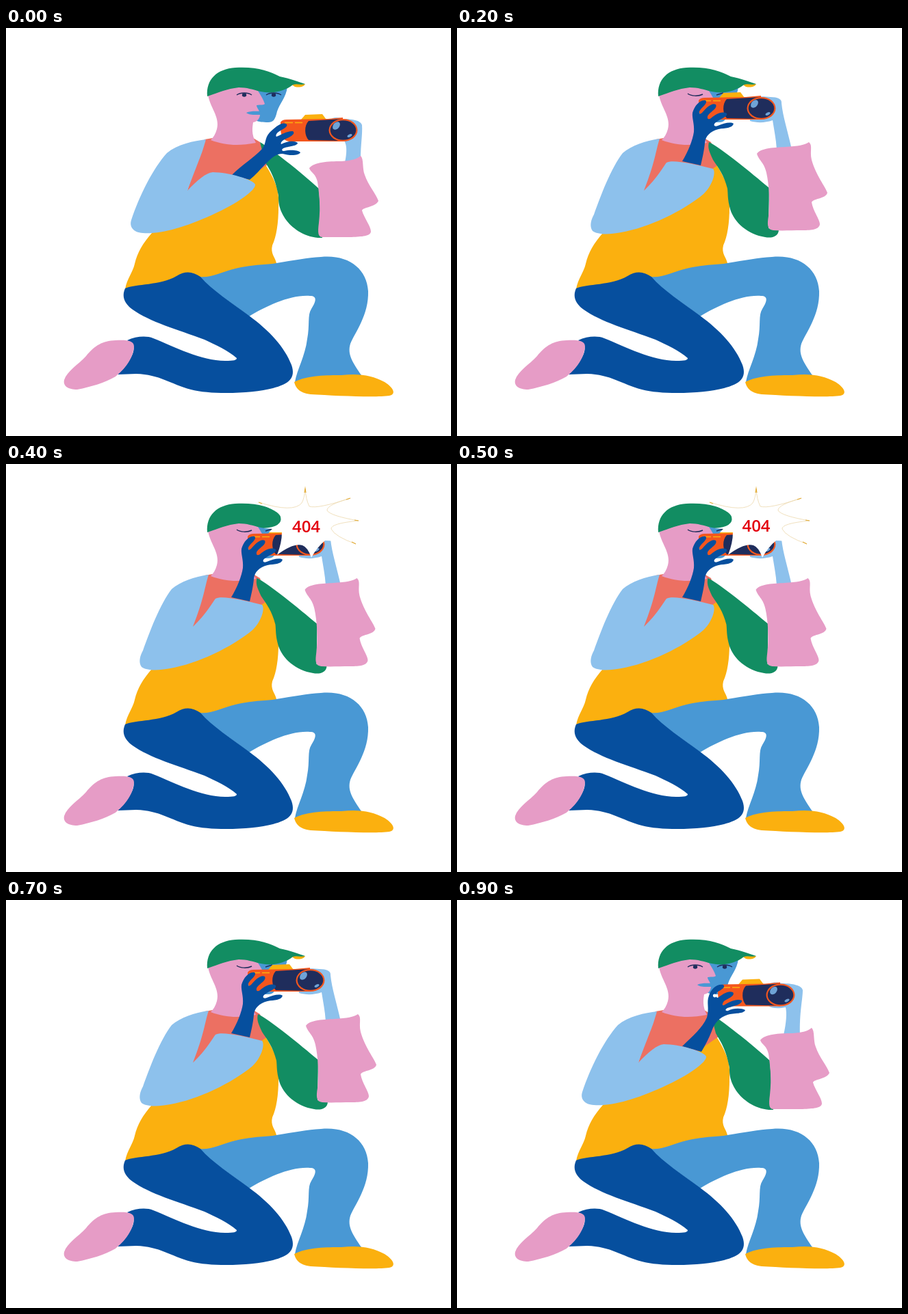
Write an HTML page with a canvas that moves like this. It is 650 px wide and 597 px high and loops after 1 s.

```html
<!DOCTYPE html>
<html lang="en">
<head>
<meta charset="utf-8">
<title>Photographer</title>
<style>
html, body { margin: 0; width: 100%; height: 100%; overflow: hidden; background: #fff; }
canvas { display: block; }
</style>
</head>
<body>
<canvas id="stage" width="650" height="597"></canvas>
<script>
const ctx = document.getElementById('stage').getContext('2d');

const C = {
  pink: '#e69cc6', green: '#128d62', yellow: '#fbb00f', sky: '#8dc1ec', blue: '#4998d4',
  royal: '#064f9e', coral: '#ec7062', orange: '#f4561d', navy: '#1f2d5c', red: '#e3000f'
};

const P = d => new Path2D(d);

const bodyParts = [
  [C.yellow, P('M213 300C200 315 192 328 188 345C185 358 177 366 174 382L250 385L320 372L380 358L395 344C393 335 386 330 389 318C395 305 398 285 398 262C400 235 392 222 379 200L350 218L300 210Z')],
  [C.blue, P('M282 364C300 366 315 357 335 352C365 345 380 347 395 344C420 340 440 336 460 335C500 331 527 352 529 385C530 420 510 445 503 462C498 478 507 490 519 508C490 510 460 508 422 518C425 500 437 480 440 455C444 435 440 420 446 411C453 400 455 392 444 392C415 390 380 407 355 422C335 405 300 385 282 364Z')],
  [C.royal, P('M174 381C190 374 225 377 249 363C262 355 272 356 284 364C301 384 330 402 355 421C385 443 407 467 417 493C424 513 412 521 390 527C360 535 300 537 270 529C240 521 225 507 190 506L163 507C175 497 190 475 186 465L177 457C190 451 205 450 215 454C245 466 285 487 320 487C333 487 337 486 337 483C325 472 305 463 290 456C250 441 210 430 185 412C170 401 170 390 174 381Z')],
  [C.pink, P('M85 515C89 502 105 493 117 480C130 464 141 458 160 457C176 456 187 457 187 466C185 486 172 500 160 510C144 519 125 525 104 529C91 529 83 524 85 515Z')],
  [C.yellow, P('M421 518C440 508 470 508 490 508C515 505 535 508 553 518C567 527 570 536 560 538C540 541 480 538 445 536C428 534 423 526 421 518Z')],
  [C.coral, P('M290 163L302 161L361 161L371 167L382 200L350 222L264 240Z')]
];

const head = [
  [C.blue, P('M362 90L411 86C409 102 400 110 396 122C393 135 390 138 383 138C375 138 369 137 366 136L362 128Z')],
  [C.pink, P('M295 97C297 115 313 130 308 148C306 155 303 160 299 164C320 172 340 173 365 168C358 155 360 145 361 138C367 137 370 133 371 128C371 120 366 117 366 113C372 112 377 113 378 111C376 105 372 98 368 92L345 84L300 92Z')],
  [C.blue, P('M351 124C358 121 366 122 373 122L373 127C365 127 356 128 351 124Z')],
  [C.yellow, P('M416 82L437 82C434 87 428 87 422 86Z')],
  [C.green, P('M294 100C292 75 308 60 335 58C365 56 385 63 400 71C415 74 428 79 437 82C430 84 425 81 419 83C408 92 390 97 372 93C360 90 352 87 340 87C322 89 312 94 294 100Z')]
];

const eyesOpen = P('M337 98C343 94 353 94 359 98M380 98C386 94 396 94 402 98');
const eyesShut = P('M337 96C342 100 353 100 359 97M379 98L389 95');

const lowArms = {
  arm: P('M292 163C286 185 285 185 265 238C280 222 292 212 302 211C325 211 362 222 364 229C365 237 340 256 300 274C260 292 225 302 200 300C185 299 180 290 183 281C195 245 215 205 235 183C250 170 275 165 292 163Z'),
  green: P('M371 167C385 175 430 210 457 235L462 307C440 308 420 295 410 282C398 265 398 255 398 245C392 215 385 208 378 195Z'),
  sleeve: P('M443 205C450 196 470 195 490 195C505 194 512 192 518 187C523 192 520 205 524 215C529 230 540 242 544 253C540 262 522 262 520 267C523 278 533 290 533 298C532 305 520 305 505 306L462 306C456 306 455 300 457 285C460 260 457 240 455 225C452 212 445 212 443 205Z')
};
const low = {
  ...lowArms, cam: [0, 0],
  grip: P('M472 137C475 130 485 130 492 133C505 133 518 135 520 142C521 155 518 170 518 192L495 197C499 178 497 170 494 165L480 160Z'),
  hand: P('M330 215C345 200 362 190 374 177C381 168 377 162 385 153C392 146 402 137 409 140C414 144 404 148 398 152C394 155 394 158 395 159C402 156 412 150 419 151C424 155 414 160 407 163C402 166 401 168 402 170C410 166 420 164 426 168C426 173 412 173 405 176C402 178 403 180 406 180C414 178 426 178 430 182C428 187 414 187 404 184C394 184 388 190 378 200C370 208 365 215 356 222Z')
};
const mid = {
  ...lowArms, cam: [-20, -10.5], gap: true,
  grip: P('M453 127C456 120 465 119 475 122C490 122 504 125 505 132C505 145 500 165 501 197L477 197C481 180 482 165 480 157C470 159 460 159 455 155Z'),
  hand: P('M329 214C345 198 358 188 365 172C369 158 364 150 368 140C371 130 380 122 389 124C393 128 386 131 380 135C377 138 378 143 381 143C388 138 396 132 403 135C407 140 396 144 390 148C387 152 387 154 390 154C398 149 408 144 416 147C417 153 404 155 395 158C391 160 392 163 396 162C404 158 415 158 421 161C419 167 405 165 395 168C383 172 376 180 372 192C368 202 363 212 357 222Z')
};
const high = {
  cam: [-48, -32], shut: true,
  arm: P('M296 162C290 180 290 195 273 238C292 220 300 205 306 197C315 192 345 199 374 206C379 212 372 232 360 243C330 268 280 292 240 299C220 303 205 302 198 297C193 290 196 280 200 273C210 245 225 205 242 183C255 172 275 165 296 162Z'),
  green: P('M368 167C385 175 430 212 456 234L455 293L470 295C470 305 460 308 450 306C425 302 405 285 399 265C395 250 396 245 395 235C390 215 382 205 374 193C368 180 366 175 368 167Z'),
  sleeve: P('M438 184C444 175 465 175 480 174C498 173 508 171 514 167C520 172 515 180 518 193C524 215 538 232 541 241C539 250 521 249 518 255C520 268 530 280 530 287C529 295 518 296 505 296C487 296 475 297 462 296C453 295 453 288 455 275C457 255 456 230 452 212C449 197 441 194 438 184Z'),
  grip: P('M426 104C433 99 448 100 458 101C468 101 475 104 474 110C476 130 483 150 489 178L467 178C466 162 463 148 461 135C450 139 438 139 428 136Z'),
  hand: P('M329 195C338 180 344 165 346 152C347 140 343 132 344 124C347 113 356 104 363 106C367 110 358 115 354 122C353 127 355 126 358 124C364 117 372 109 378 112C381 118 370 122 366 129C365 134 368 134 371 132C378 126 387 121 394 125C396 130 384 133 377 139C374 142 376 145 381 143C390 139 400 137 404 140C402 147 392 146 382 148C370 151 363 158 362 168C361 180 358 192 356 201Z')
};
const flash = { ...high, recoil: -1.5, burst: true };

const rays = 'M369 56Q420 72 432 57Q436 50 437 36Q438 52 443 62Q455 66 503 50Q468 60 469 68Q474 76 515 83Q474 87 475 95Q480 106 511 117';
const burst = P(rays + 'Q475 112 466 112Q454 122 446 137Q441 122 433 119Q420 115 396 133Q403 115 403 100L384 100L389 95L376 94Q405 92 401 77C398 69 385 66 369 56Z');
const burstEdge = P(rays);
const burstTips = P('M436 42L437 36L438 42M497 52L503 50M509 82L515 83M505 114L511 117M369 56L374 58');

const prism = P('M431 134L437 127L462 126L468 134Z');
const body = P('M401 138Q403 134 410 134L470 133L492 131L492 166L415 166C400 165 401 150 401 138Z');
const barrel = P('M442 136L492 133L492 165L442 164C436 158 435 143 442 136Z');
const trim = P('M407 138.5H419M422 138.5H433');

const fill = (color, path) => { ctx.fillStyle = color; ctx.fill(path); };
const stroke = (color, width, path) => {
  ctx.strokeStyle = color;
  ctx.lineWidth = width;
  ctx.stroke(path);
};
const oval = (color, x, y, rx, ry, turn = 0) => {
  ctx.beginPath();
  ctx.ellipse(x, y, rx, ry, turn, 0, Math.PI * 2);
  ctx.fillStyle = color;
  ctx.fill();
};
const shifted = (x, y, paint) => {
  ctx.save();
  ctx.translate(x, y);
  paint();
  ctx.restore();
};

function drawCamera() {
  fill(C.yellow, prism);
  fill(C.orange, body);
  stroke(C.yellow, 1.5, trim);
  fill(C.navy, barrel);
  oval(C.orange, 492.5, 149.5, 21, 16.5);
  oval(C.navy, 492.5, 149.5, 18.8, 14.3);
  oval('#6fa3d6', 482.5, 143, 4.5, 6.5, 0.7);
  oval('#6fa3d6', 502, 157.5, 3.8, 1.9, -0.5);
}

function drawEyes(shut) {
  stroke(C.navy, 1.5, shut ? eyesShut : eyesOpen);
  if (shut) return;
  oval(C.navy, 348, 98, 3.2, 2.8);
  oval(C.navy, 391, 98, 3.2, 2.8);
}

function drawBurst(step) {
  fill('#fff', burst);
  stroke('#ecd9ad', 0.8, burstEdge);
  stroke('#e3ad3a', 1.2, burstTips);
  const drift = (step - 4) * 1.5;
  ctx.fillStyle = C.red;
  ctx.font = '600 24px "Open Sans", "Noto Sans", sans-serif';
  ctx.textAlign = 'center';
  ctx.fillText('404', 438.5 - drift, 100 - drift);
}

const poses = [low, mid, high, flash, flash, flash, flash, high, high, mid];

function draw(time) {
  const step = Math.floor(time % 1000 / 100);
  const pose = poses[step];
  ctx.fillStyle = '#fff';
  ctx.fillRect(0, 0, 650, 597);
  for (const part of [...bodyParts, ...head]) fill(...part);
  drawEyes(pose.shut);
  fill(C.sky, pose.grip);
  shifted(...pose.cam, drawCamera);
  shifted(pose.recoil || 0, 0, () => {
    fill(C.green, pose.green);
    fill(C.pink, pose.sleeve);
  });
  fill(C.royal, pose.hand);
  if (pose.gap) oval('#fff', 376.5, 140, 2.6, 2.4);
  fill(C.sky, pose.arm);
  if (pose.burst) drawBurst(step);
}

const start = performance.now();
function loop() {
  draw(performance.now() - start);
  requestAnimationFrame(loop);
}
loop();
</script>
</body>
</html>
```
